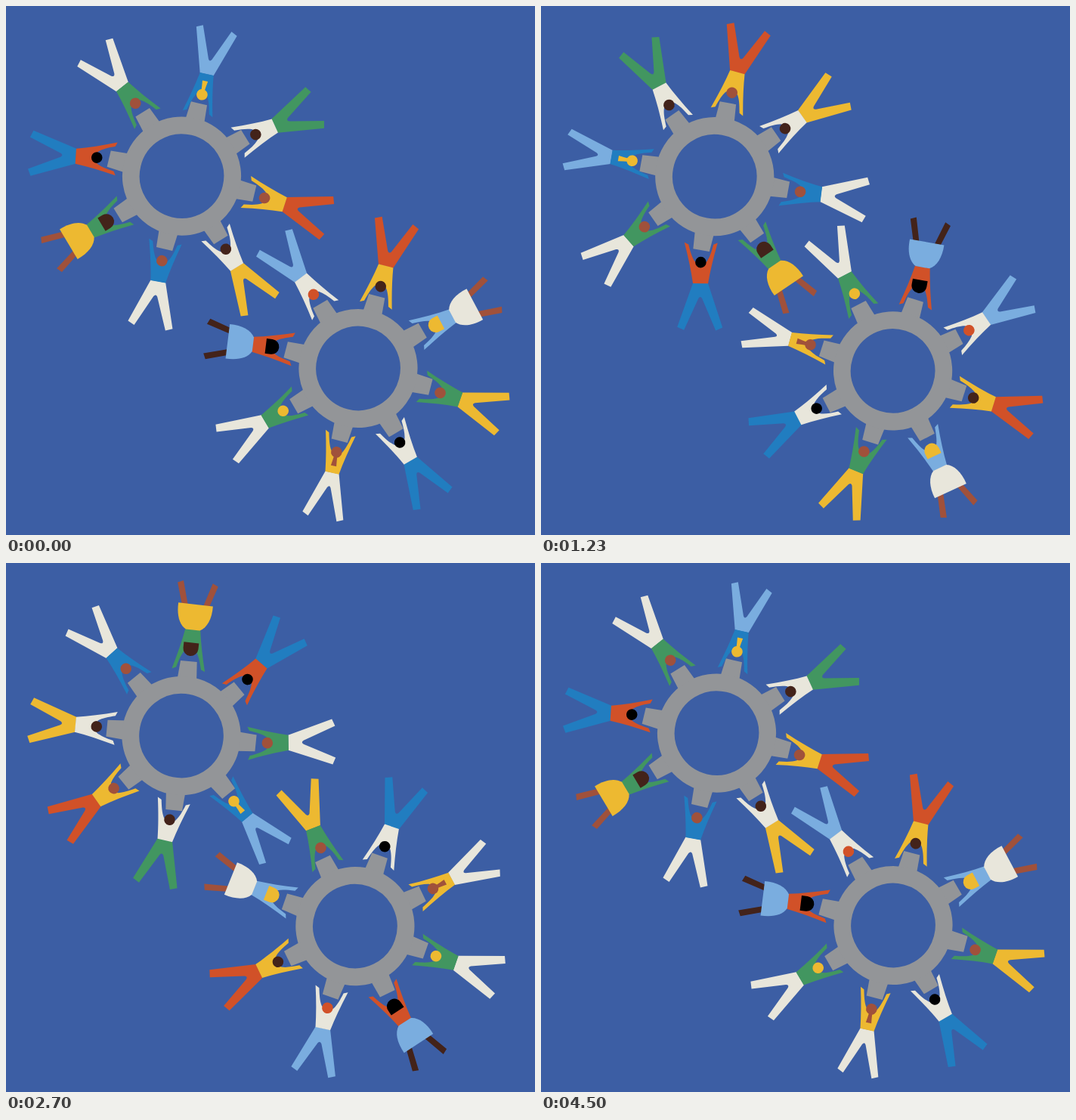
An HTML page that plays this animation: 700 px wide and 700 px high, repeating every 4.8 s.

```html
<!DOCTYPE html>
<html lang="en">
<head>
<meta charset="utf-8">
<title>Turning together</title>
<style>
html, body { margin: 0; width: 100%; height: 100%; overflow: hidden; background: #3c5ea4; }
svg { display: block; width: 100vw; height: 100vh; }
</style>
</head>
<body>
<svg id="stage" viewBox="0 0 700 700"></svg>
<script>
const C = {
  gear: '#939598', white: '#e8e6db', red: '#d15128', gold: '#edb931', green: '#429660',
  blue: '#217dc0', sky: '#7aaddf', brown: '#a0513b', dark: '#43231a', black: '#000'
};

// Body parts: origin at the waist, hands towards +y, feet towards -y.
const TORSO = 'M-10 0C-12.5 16-16.5 34-22 54L-16.5 51.5C-14 42-12 35-8 29Q0 24 8 29C12 35 14 42 16.5 51.5L22 54C16.5 34 12.5 16 10 0Z';
const TROUSERS = 'M-10 .3L-30 -58L-21 -62L-2.5 -20Q0 -16 2.5 -20L21 -62L30 -58L10 .3Z';
const SKIRT = 'M-9.3 .3C-18.5 -4.5-23.5-17-23-33.5L23-33.5C23.5-17 18.5-4.5 9.3 .3Z';
const BARE_LEGS = 'M10.5-33L19.5-63.5L27-60L18.5-33ZM-10.5-33L-19.5-63.5L-27-60L-18.5-33Z';
const TAIL = 'M-2 24Q-2.6 17-3.7 9.5L3.7 9.5Q2.6 17 2 24Z';
const BOB = 'M-10 17.3L10 17.3V25A10 10 0 0 1-10 25Z';

const part = (d, color) => `<path d="${d}" fill="${C[color]}"/>`;
const head = color => `<circle cy="28" r="7.3" fill="${C[color]}"/>`;

const KINDS = {
  man: (top, legs, skin) => part(TROUSERS, legs) + part(TORSO, top) + head(skin),
  tail: (top, legs, skin) =>
    `<g transform="scale(.92 1)">${part(TROUSERS, legs)}${part(TORSO, top)}</g>` + part(TAIL, skin) + head(skin),
  skirt: (top, skirt, hair, skin) =>
    part(BARE_LEGS, skin) + part(TORSO, top) + part(SKIRT, skirt) + part(BOB, hair)
};

// Each person: waist x, y, tilt, kind, colours. "turn" lists the resting angles.
const gears = [
  {
    pivot: [231.4, 226.7], center: [232.5, 225.1], phase: 13.4,
    turn: [0, -45, -92, -138, -184, -232.7, -281, -320.6, -360],
    people: [
      [265.7, 90, 13, 'tail', 'blue', 'sky', 'gold'],
      [355.8, 158.5, 65.6, 'man', 'white', 'green', 'dark'],
      [368.7, 262.7, 108, 'man', 'gold', 'red', 'brown'],
      [305.6, 345.5, 148.2, 'man', 'white', 'gold', 'dark'],
      [201.3, 364.7, 190.3, 'man', 'blue', 'white', 'brown'],
      [111.6, 298, 239.1, 'skirt', 'green', 'gold', 'dark', 'brown'],
      [92.3, 198.7, 273.9, 'man', 'red', 'blue', 'black'],
      [153.8, 106.8, -38.4, 'man', 'green', 'white', 'brown']
    ]
  },
  {
    pivot: [464.2, 481], center: [466, 479.5], phase: 14.5,
    turn: [0, 45, 92, 138, 184.2, 229.8, 275.7, 317.8, 360],
    people: [
      [502.7, 344, 14.3, 'man', 'gold', 'red', 'dark'],
      [590.8, 410.3, 62, 'skirt', 'sky', 'white', 'gold', 'brown'],
      [601, 521, 109.1, 'man', 'green', 'gold', 'brown'],
      [535.3, 601.7, 149.6, 'man', 'white', 'blue', 'black'],
      [431.5, 617.7, 192.1, 'tail', 'gold', 'white', 'brown'],
      [342.6, 550, 239.4, 'man', 'green', 'white', 'gold'],
      [326.6, 447.8, 277, 'skirt', 'red', 'sky', 'black', 'dark'],
      [390, 359.5, -37.2, 'man', 'white', 'sky', 'red']
    ]
  }
];

function wheel({ center, phase }) {
  let teeth = '';
  for (let i = 0; i < 8; i++) {
    teeth += `<path transform="rotate(${i * 45})" d="M-12.8-74L-10.9-99L10.9-99L12.8-74Z"/>`;
  }
  return `<g transform="translate(${center}) rotate(${phase})" fill="${C.gear}">${teeth}` +
    `<circle r="67.2" fill="none" stroke="${C.gear}" stroke-width="22.8"/></g>`;
}

const person = ([x, y, tilt, kind, ...colors]) =>
  `<g transform="translate(${x} ${y}) rotate(${tilt})">${KINDS[kind](...colors)}</g>`;

const stage = document.getElementById('stage');
stage.innerHTML = gears.map(g => `<g>${wheel(g)}${g.people.map(person).join('')}</g>`).join('');
gears.forEach((g, i) => { g.node = stage.children[i]; });

const LOOP = 4800, BEAT = 600, TICK = 30, TICKS = 10;
const ease = p => (1 - Math.cos(Math.PI * p)) / 2;

function draw(now) {
  const t = now % LOOP;
  const beat = Math.floor(t / BEAT);
  const p = ease(Math.min(1, Math.floor((t % BEAT) / TICK) / TICKS));
  for (const { node, pivot, turn } of gears) {
    const angle = turn[beat] + (turn[beat + 1] - turn[beat]) * p;
    node.setAttribute('transform', `rotate(${angle.toFixed(3)} ${pivot.join(' ')})`);
  }
}

function loop() {
  draw(performance.now());
  requestAnimationFrame(loop);
}
loop();
</script>
</body>
</html>
```
